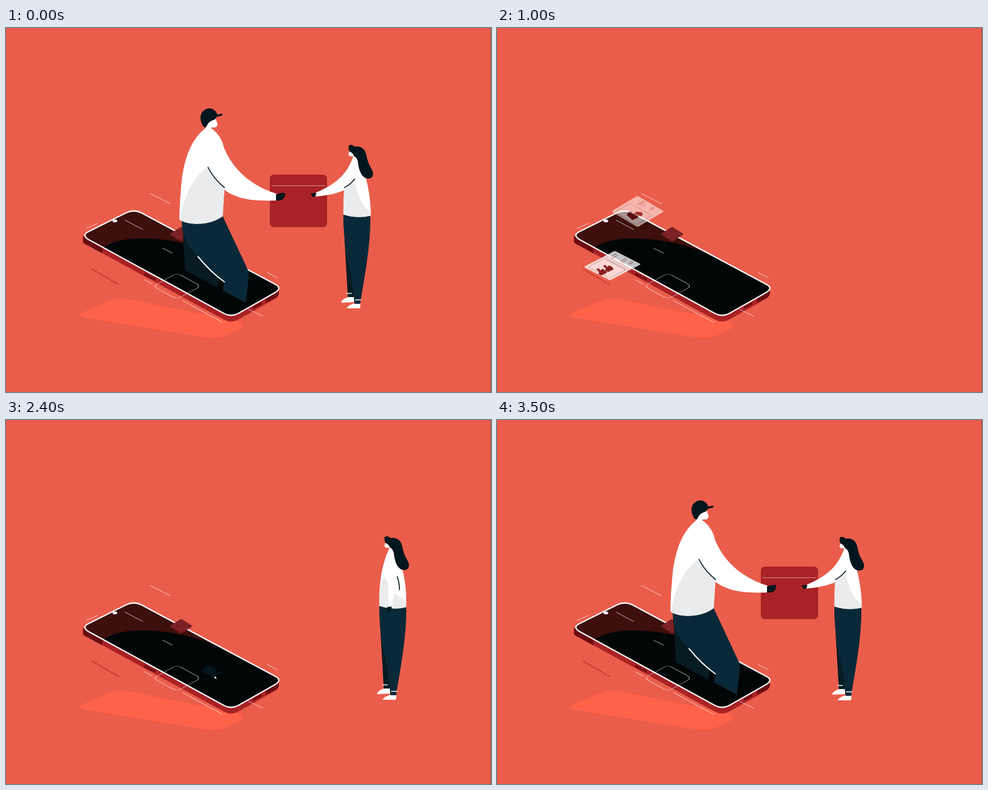
Animation of 864x648 px, one loop 5.6 s. Source, as an HTML page:

```html
<!DOCTYPE html>
<html lang="en">
<head>
<meta charset="utf-8">
<title>Delivery from the phone</title>
<style>
  html, body { margin: 0; width: 100%; height: 100%; overflow: hidden; background: #ea5d4b; }
  svg { display: block; width: 100%; height: 100%; }
  .ink { fill: #04161d; }
  .pants { fill: #0a2938; }
  .shade { fill: #071b23; }
  .white { fill: #fff; }
  .grey { fill: #eaebed; }
  .maroon { fill: #7b2024; }
  .wine { fill: #6b0c13; }
  .red { fill: #a92225; }
  .fold { fill: none; stroke: #04161d; stroke-width: 1.7; stroke-linecap: round; }
  .print { fill: none; stroke: #b05a5a; stroke-width: 1; }
  .frame { fill: none; stroke: #cdb4b4; stroke-width: 1.3; }
</style>
</head>
<body>
<svg viewBox="0 0 864 648">
  <defs>
    <path id="screen" d="M146 376L388 508Q401 515 414 508L481 470Q491 463 481 457L243 330Q228 322 214 329L146 363Q135 369 146 376Z"/>
    <path id="bottle" class="wine" d="M177 428L181 426L184 430L188 427L193 430L196 434L186 439L181 437L182 433Z"/>
    <clipPath id="onScreen"><use href="#screen"/></clipPath>
    <!-- everything above the phone surface -->
    <clipPath id="aboveScreen">
      <path d="M280 0V410L317 430L427 489L432 479Q443 469 473 470Q480 469 487 463L600 459V0Z"/>
    </clipPath>
  </defs>

  <rect width="864" height="648" fill="#ea5d4b"/>

  <g id="phone">
    <path fill="#fe6248" d="M134 507L190 484Q205 479 225 484L412 522Q424 526 420 534L388 549Q372 554 350 550L140 516Q126 511 134 507Z"/>
    <path class="red" d="M137 370V380Q138 384 146 387L388 519Q401 526 414 519L481 481Q487 478 486 463L400 480Z"/>
    <path class="wine" d="M137 370V380Q138 384 146 387L171 401L173 390ZM464 479L486 465V474Q485 477 481 480L463 489ZM246 436L267 446V450L246 440ZM440 496L455 488V492L440 500Z"/>
    <use href="#screen" fill="#020607"/>
    <path clip-path="url(#onScreen)" fill="#3d0f0d" d="M130 392L176 390C200 371 260 372 300 380C340 386 380 402 412 420L430 400L240 310L120 350Z"/>
    <use href="#screen" fill="none" stroke="#fff" stroke-width="2.3"/>
    <ellipse class="white" cx="194" cy="343.5" rx="4.2" ry="2.5"/>
  </g>

  <g id="accents">
    <path fill="none" stroke="#fff" stroke-opacity=".55" stroke-width="1.2" d="M256 294L293 313M142 357L163 348M212 342L244 359M279 392L297 401M465 435L484 445M246 448L261 456M314 485L386 524M432 501L458 513"/>
    <path stroke="#b52d26" stroke-width="1.3" d="M153 429L201 457"/>
    <rect x="-24.2" y="-24.2" width="48.4" height="48.4" rx="8" fill="none" stroke="#fff" stroke-opacity=".5" stroke-width="1.4" transform="matrix(.88 .475 .88 -.48 304.5 459.5)"/>
    <rect class="maroon" x="-11.8" y="-11.8" width="23.6" height="23.6" rx="3" transform="matrix(.88 .56 .88 -.56 312 367)"/>
  </g>

  <g id="upperCard">
    <g transform="matrix(.86 .51 .86 -.51 250.5 326.5)">
      <rect class="white" x="-27.4" y="-27.4" width="54.8" height="54.8" rx="3"/>
      <rect class="frame" x="-22" y="-25" width="44" height="32" rx="4"/>
    </g>
    <path class="wine" d="M231 333L233 329L238 326L243 330L249 327L258 328L260 332L257 335L251 334L252 337L241 342L237 338Z"/>
    <path class="print" d="M250 314L262 307M253 316L265 309M256 319L264 314M273 322L278 319L280 321L275 324Z"/>
  </g>

  <g id="lowerCard">
    <g transform="matrix(.88 .455 .88 -.455 205.5 421.5)">
      <rect class="white" x="-26.5" y="-31.5" width="53" height="63" rx="2.5"/>
      <rect class="frame" x="-22" y="-27" width="44" height="33" rx="4"/>
    </g>
    <use href="#bottle"/>
    <use href="#bottle" x="12" y="-6"/>
    <path class="print" d="M203 406L213 400M205 409L215 403M220 414L230 408M222 417L232 411M235 417L240 414L242 416L237 419Z"/>
  </g>

  <g id="cart">
    <rect class="maroon" x="-26.5" y="-26.5" width="53" height="53" rx="8" transform="matrix(.88 .475 .88 -.48 422.5 475)"/>
    <path class="white" d="M404 473L422 466L426 469L438 472L435 480L414 483Z"/>
    <path fill="none" stroke="#fff" stroke-width="1.5" d="M421 467L432 460M414 483L436 479"/>
    <circle class="white" cx="427" cy="483.5" r="2.5"/>
    <circle class="white" cx="434" cy="481" r="2.5"/>
  </g>

  <g clip-path="url(#aboveScreen)">
    <g id="courier">
      <rect class="red" x="470" y="261" width="102" height="93.5" rx="7"/>
      <path stroke="#dc9a94" stroke-width="1.1" d="M473 280.7H569"/>
      <path class="shade" d="M314 345L319 432L376 463L379 446L345 395Z"/>
      <path class="pants" d="M313 343Q350 350 386 335L432 433Q433 445 431 455L427 491L386 468L389 452Q362 432 341 406Q322 388 314 360Z"/>
      <path fill="none" stroke="#fff" stroke-width="2" stroke-linecap="round" d="M342 407Q364 434 389 452"/>
      <path class="white" d="M357 177C332 195 319 228 313.500 267C310 300 309 325 309 341C325 351 362 353 386 335L389 288C410 304 440 309 482 307V295C433 280 402 248 388 212Q384 193 368 180Z"/>
      <path class="grey" d="M310 342C316 300 335 262 360 248Q369 267 389 285L386 335C362 353 325 351 310 342Z"/>
      <path class="fold" d="M360 248Q369 267 389 284"/>
      <path class="white" d="M358 171Q363 164 373 160L377 171Q376 178 370 177L366 177L366 184L354 181Z"/>
      <path class="ink" d="M350 173Q343 158 350 149Q361 138 372 147Q376 151 376 154L385 152.500Q387 155 384 156L375 158.500L372 163Q364 165 360 170L356 177Q352 177 350 173Z"/>
      <path class="ink" d="M481 296L489 294Q499 292 497.500 297Q496 305 489 307L481 307Z"/>
    </g>
  </g>

  <g id="customer">
    <path class="white" d="M661 486Q666 480 674 478H684V487L662 488ZM671 497Q678 490 686 489H695Q696 496 694 498H672Z"/>
    <path class="shade" d="M665 340L673 478H683L690 400Z"/>
    <path class="pants" d="M665 330Q690 338 713 333C714 385 703 440 695 490H685L679 440C672 410 665 380 665 330Z"/>
    <path stroke="#fff" stroke-width="1.5" d="M670.500 471.500H680M686 483H697"/>
    <g id="waiting">
      <path class="white" d="M683 228C670 255 664 290 665 331Q690 339 713 333C714 300 709 275 705 262L691 236Z"/>
      <path class="grey" d="M666 299L673 279L681 291V333L665 331ZM692 309L713 322V333Q700 337 686 335Z"/>
      <path class="fold" d="M697 279Q701 290 701 302"/>
      <path class="ink" d="M679 333L687 332Q687 340 680 342Z"/>
    </g>
    <g id="receiving" transform="translate(64 -1)">
      <path class="white" d="M619 228C610 252 598 274 552 293L551 300C575 298 590 294 602 289L601 332Q626 340 650 334C650 300 643 275 640 262L627 236Z"/>
      <path class="grey" d="M602 288L621 270C625 297 635 318 650 328V334Q626 340 601 332Z"/>
      <path class="fold" d="M603 284Q613 279 621 269"/>
      <path class="ink" d="M542 295Q548 293 553 294L551 300L546 301Q545 297 542 295Z"/>
    </g>
    <path class="white" d="M676 218L674 224Q676 229 682 227L685 232L691 234L687 219Z"/>
    <path class="ink" d="M675 208Q680 205 685 210Q702 208 706 225C709 245 718 250 718 259Q717 268 708 267C697 266 692 250 691 238Q690 230 684 227Q681 220 676 219Q673 212 675 208Z"/>
  </g>

  <rect x="863" width="1" height="648" fill="#b54a3d"/>
</svg>

<script>
const LOOP = 5600, STEP = 100;
const part = Object.fromEntries([...document.querySelectorAll("g[id]")].map(g => [g.id, g]));

// Linear change from a to b while t runs from start to end.
function ramp(t, start, end, a = 0, b = 1) {
  const k = Math.min(1, Math.max(0, (t - start) / (end - start)));
  return a + (b - a) * k;
}

function place(name, opacity, x = 0, y = 0) {
  part[name].setAttribute("transform", `translate(${x} ${y})`);
  part[name].setAttribute("opacity", opacity);
}

function draw(time) {
  let t = Math.floor(time % LOOP / STEP) * STEP;
  if (t < 100) t += LOOP;             // the closing pose carries into the next loop
  const leaving = ramp(t, 1900, 2200, 1, 0);
  const together = t >= 3500;

  place("phone", ramp(t, 100, 400), ramp(t, 100, 400, -31, 0));
  place("accents", t < 600 ? ramp(t, 400, 500, 0, .22) : 1);

  const cardStart = ramp(t, 400, 500, 0, .18);
  place("upperCard", (cardStart + ramp(t, 500, 1600, 0, .82)) * leaving);
  place("lowerCard", (cardStart + ramp(t, 500, 1200, 0, .82)) * leaving, 0, ramp(t, 1400, 1800, 1.5, 0));
  place("cart", ramp(t, 1400, 1800) * leaving);

  place("courier", t >= 2400 ? 1 : 0, 0, ramp(t, 2400, 3400, 295, 0));
  place("customer", ramp(t, 1400, 1800), together ? -64 : ramp(t, 1400, 1800, 149, 0), together ? 1 : 0);
  part.waiting.setAttribute("opacity", together ? 0 : 1);
  part.receiving.setAttribute("opacity", together ? 1 : 0);
}

const started = performance.now();
function tick() {
  draw(performance.now() - started);
  requestAnimationFrame(tick);
}
tick();
</script>
</body>
</html>
```
